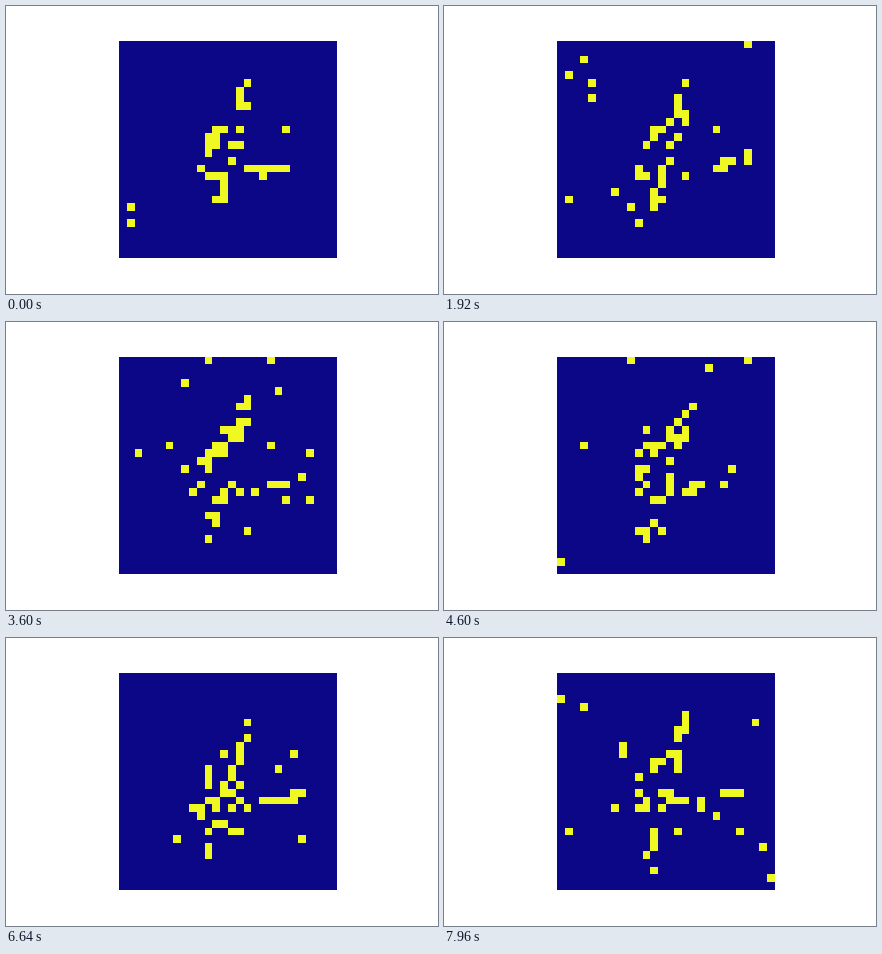
These frames come from a looping animation (432 by 288 pixels, 8000 ms). A matplotlib script:

```python
import numpy as np
import matplotlib.pyplot as plt
from matplotlib.animation import FuncAnimation

SIZE = 28
FRAMES = 200
INTERVAL = 40
SEED = 11
NOISE = 0.011
PEAK = 0.62
SPREAD = 0.72

# A handwritten 4 as three quadratic curves: start, control, end (column, row)
STROKES = [
    [(15.8, 5.6), (14.6, 14.6), (10.8, 23)],
    [(14.2, 9.8), (10.5, 12), (9.8, 16.8)],
    [(10, 16.8), (17, 17.5), (22.8, 15)],
]


def curve(start, control, end, n=80):
    t = np.linspace(0, 1, n)[:, None]
    return ((1 - t) ** 2 * np.array(start) + 2 * t * (1 - t) * np.array(control)
            + t ** 2 * np.array(end))


def spike_rate():
    """Chance of each cell lighting up: high on the strokes, low elsewhere."""
    pen = np.concatenate([curve(*s) for s in STROKES])
    y, x = np.mgrid[:SIZE, :SIZE]
    dist = np.hypot(x[..., None] - pen[:, 0], y[..., None] - pen[:, 1]).min(axis=-1)
    return NOISE + PEAK * np.exp(-(dist / SPREAD) ** 2)


RATE = spike_rate()


def spikes(i):
    rng = np.random.default_rng((SEED, i))
    return (rng.random(RATE.shape) < RATE).astype(float)


fig, ax = plt.subplots(figsize=(6, 4), dpi=72, facecolor="white")
fig.subplots_adjust(left=0.125, right=0.9, bottom=0.125, top=0.88)
ax.axis("off")
image = ax.imshow(spikes(0), cmap="plasma", vmin=0, vmax=1, interpolation="nearest")


def update(i):
    image.set_data(spikes(i))
    return [image]


anim = FuncAnimation(fig, update, frames=FRAMES, interval=INTERVAL,
                     repeat=True, repeat_delay=0, blit=False)
plt.show()
```
